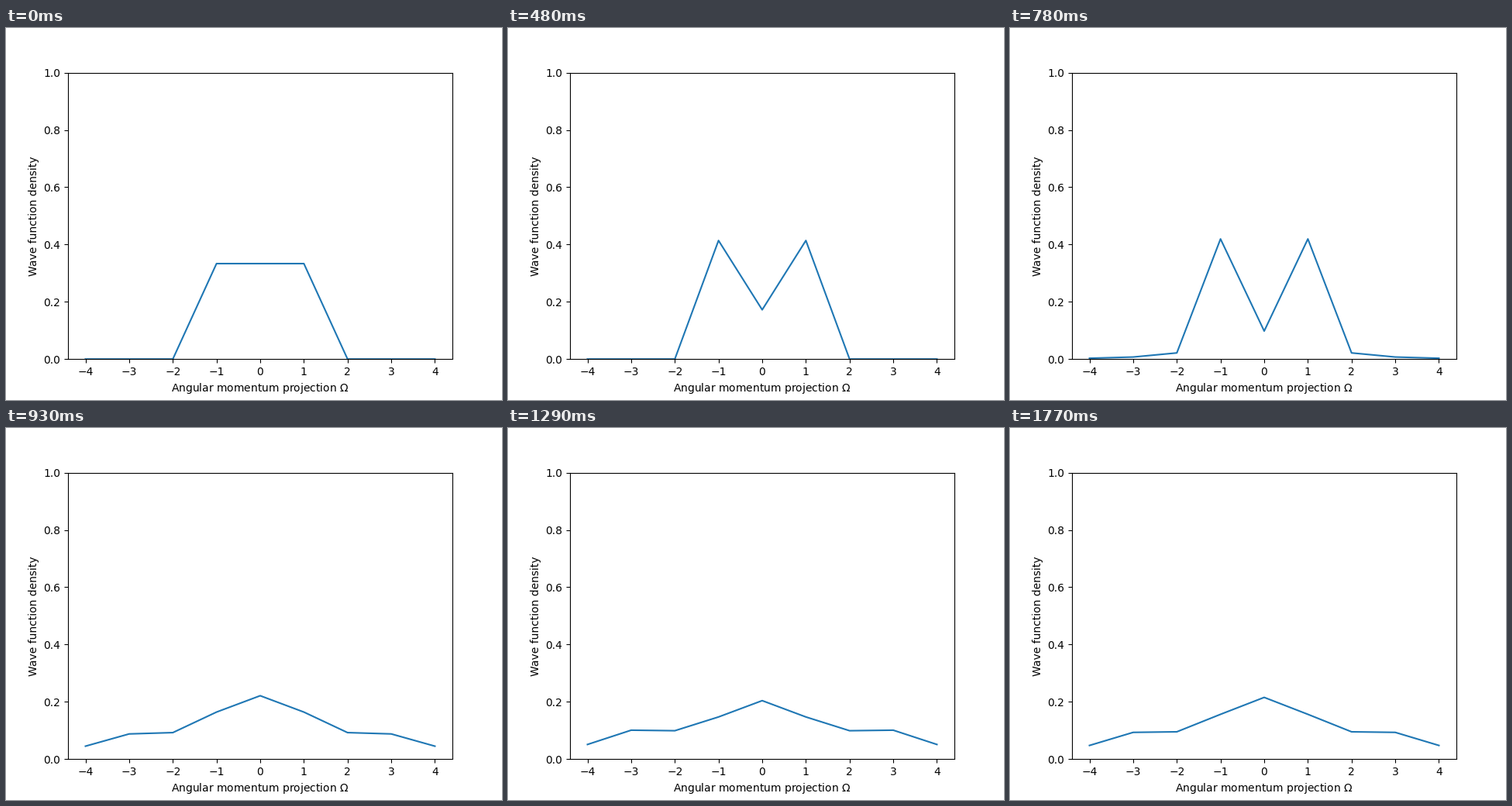
A matplotlib script for the animation above (1800 ms loop, 640 by 480 pixels).

```python
import numpy as np
import matplotlib.pyplot as plt
from matplotlib.animation import FuncAnimation

FRAMES, INTERVAL = 60, 30

# one entry per shell |omega| = 0, 2, 3, 4; |omega| = 1 takes the rest
REST = np.array([.2113, .0966, .0960, .0488])
SWING = np.array([.0107, -.0036, -.0072, -.0032])
SPREAD = np.array([.56, 1, 1.72, 1.87])  # later filling for larger values


def density(step):
    # the centre empties at an exponentially growing rate
    centre = max(0, 1 / 3 - .0745 * np.expm1(.072 * step))
    start = np.array([centre, 0, 0, 0])

    # a damped swing around the spread-out state
    t = max(0, step - 31)
    end = REST + SWING * np.exp(-.03 * t) * np.cos(np.pi * t / 13)

    # fast crossover between the two
    mix = (1 / (1 + np.exp(-1.25 * (step - 26.96)))) ** SPREAD
    p0, p2, p3, p4 = start + (end - start) * mix
    p1 = (1 - p0) / 2 - p2 - p3 - p4
    return [p4, p3, p2, p1, p0, p1, p2, p3, p4]


fig, ax = plt.subplots(figsize=(6.4, 4.8), dpi=100)
omega = np.arange(-4, 5)
line, = ax.plot(omega, density(0))
ax.set_xlim(-4.4, 4.4)
ax.set_ylim(0, 1)
ax.set_xticks(omega)
ax.set_xlabel(r"Angular momentum projection $\Omega$")
ax.set_ylabel("Wave function density")


def update(step):
    line.set_ydata(density(step))
    return line,


anim = FuncAnimation(fig, update, frames=FRAMES, interval=INTERVAL,
                     repeat=True, repeat_delay=0)
plt.show()
```
